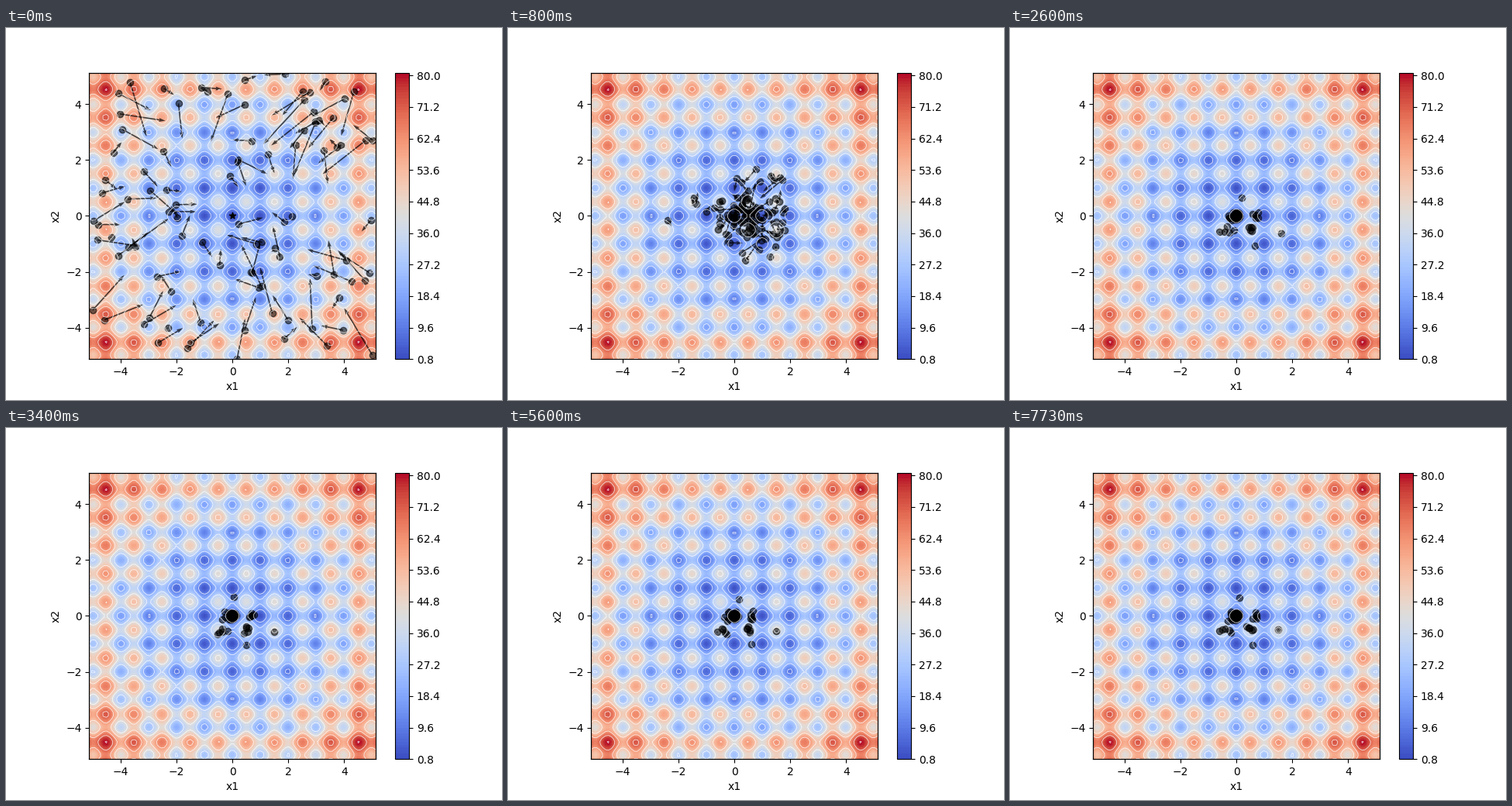
A matplotlib script for the animation above (7800 ms loop, 640x480 px).

```python
import matplotlib.pyplot as plt
import numpy as np
from matplotlib.animation import FuncAnimation

LOOP_MS, FRAMES = 7800, 117
LIM = 5.12
N = 95

# resting places away from the optimum: three loners, then four groups
LONERS = [(1.55, -.55), (.55, -1), (.13, .6)]
GROUPS = [(.5, -.5), (-.38, -.5), (.65, 0), (-.2, -.08)]
GROUP_SIZE = 5

rng = np.random.default_rng(12)


def uniform(low, high, cols=1):
    return rng.uniform(low, high, (N, cols))


home = rng.normal(0, .05, (N, 2))
away = np.vstack([LONERS, np.repeat(GROUPS, GROUP_SIZE, axis=0)])
home[:len(away)] = away
home[len(LONERS):len(away)] += rng.normal(0, .1, (len(away) - len(LONERS), 2))
shake = np.where(np.arange(N) < len(away), .07, .03)[:, None]

start = uniform(-LIM, LIM, 2)
heading = uniform(0, 2 * np.pi)
kick = uniform(.25, 1.2) * np.hstack([np.cos(heading), np.sin(heading)])
turn = uniform(.25, .7)
tau = 9.3 * np.exp(rng.normal(0, .2, (N, 1)))
pull = uniform(0, 1) * (.9, -.1)
rate = uniform(.5, 1.6, 2)
phase = uniform(0, 2 * np.pi, 2)


def swarm(k):
    """Positions of all particles at step k: a damped swing plus jitter."""
    fade = np.exp(-(k / tau) ** 1.2)
    swing = (start - home) * np.cos(turn * k) + kick * np.sin(turn * k) / turn
    drift = pull * (k / 12 * np.exp(1 - k / 12)) ** 3
    jitter = shake * (1 - np.exp(-k / 6)) * np.sin(rate * k + phase)
    return home + fade * swing + drift + jitter


def rastrigin(x, y):
    return 20 + sum(v ** 2 - 10 * np.cos(2 * np.pi * v) for v in (x, y))


x, y = np.meshgrid(*[np.linspace(-LIM, LIM, 100)] * 2)
z = rastrigin(x, y)


def draw_landscape(fig):
    """Draw the filled surface once; return its pixels and axes box."""
    ax = fig.add_subplot()
    surface = ax.contourf(x, y, z, levels=.8 * np.arange(1, 102),
                          cmap="coolwarm")
    fig.colorbar(surface, ax=ax)
    ax.set_aspect("equal")
    ax.set(xlabel="x1", ylabel="x2")
    fig.canvas.draw()
    return np.array(fig.canvas.buffer_rgba()), ax.get_position()


fig = plt.figure(figsize=(6.4, 4.8), dpi=100, facecolor="white")
pixels, box = draw_landscape(fig)
fig.clear()
fig.figimage(pixels)

ax = fig.add_axes(box, facecolor="none", zorder=1)
ax.set(xlim=(-LIM, LIM), ylim=(-LIM, LIM), xticks=[], yticks=[])
ax.scatter(0, 0, marker="*", color="black")
dots = ax.scatter(*start.T, color="black", alpha=.55)
arrows = ax.quiver(*start.T, *kick.T, angles="xy", scale_units="xy", scale=1,
                   width=.0045, color="black", alpha=.7)
# the level lines lie above the swarm
ax.contour(x, y, z, levels=np.arange(10, 90, 10), colors="white",
           linewidths=.6, alpha=.8, zorder=2)


def update(k):
    pos = swarm(k)
    step = swarm(k + 1) - pos
    dots.set_offsets(pos)
    arrows.set_offsets(pos)
    arrows.set_UVC(*step.T)
    return dots, arrows


anim = FuncAnimation(fig, update, frames=FRAMES, interval=LOOP_MS / FRAMES,
                     init_func=lambda: update(0), repeat=True, repeat_delay=0)
plt.show()
```
